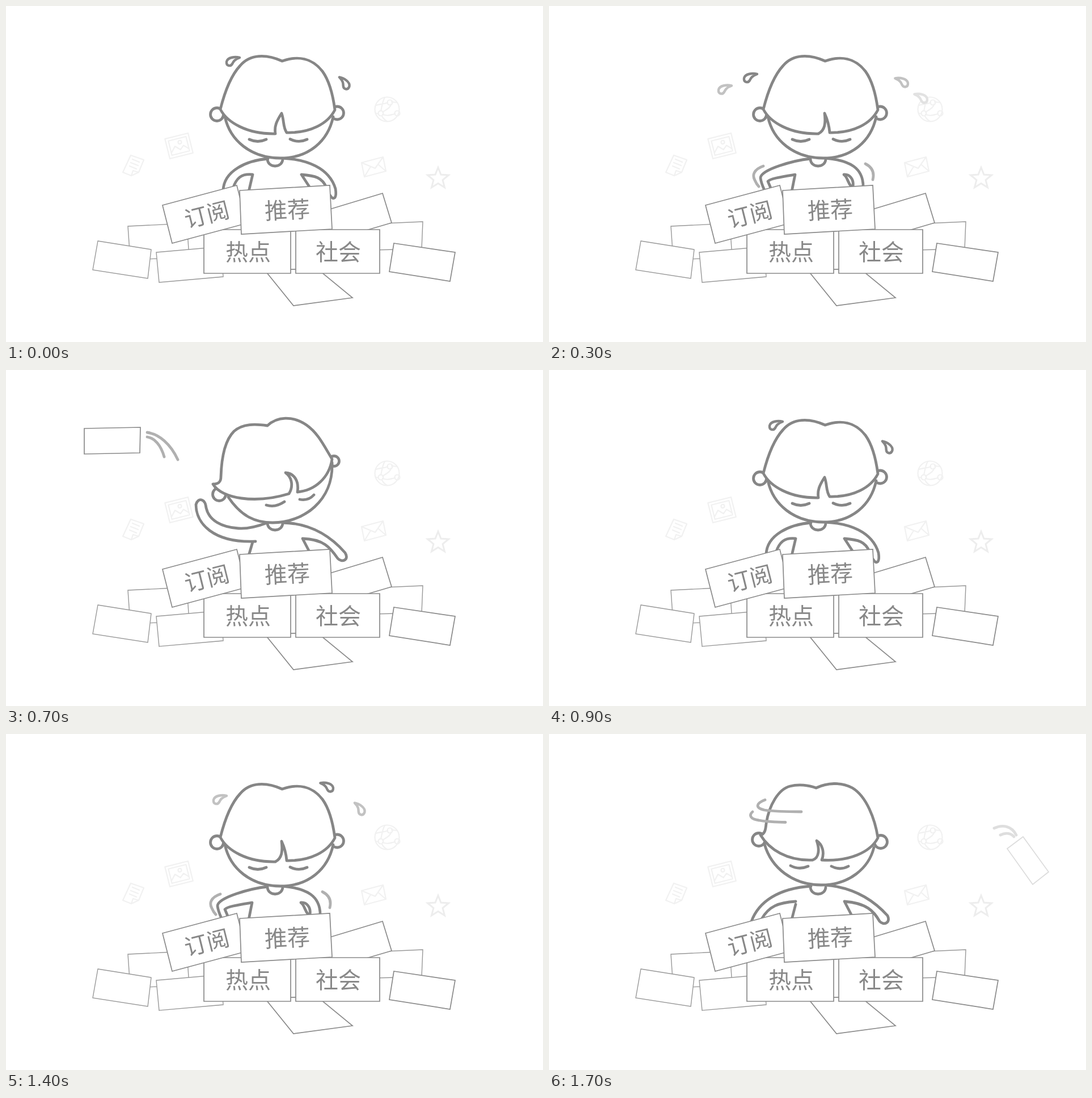
Animation, 947 px wide and 592 px high, one loop 1.8 s. Source, as an HTML page:

```html
<!DOCTYPE html>
<html lang="zh-CN">
<head>
<meta charset="utf-8">
<title>Buried in cards</title>
<style>
  html, body { margin: 0; width: 100%; height: 100%; overflow: hidden; background: #fff; }
  svg { display: block; width: 947px; height: 592px; }
  svg * { stroke-linecap: round; stroke-linejoin: round; }
  .icons { fill: none; stroke: #f1f1f1; stroke-width: 2.2; }
  #star { stroke: #ededed; stroke-width: 3; stroke-linejoin: miter; }
  .boy { fill: none; stroke: #868686; stroke-width: 4.8; }
  .skin { fill: #fff; }
  .mark { stroke: #b0b0b0; }
  .pale { stroke: #dedede; }
  .card { fill: #fff; stroke: #8a8a8a; stroke-width: 1.7; stroke-linejoin: miter; }
  .back .card { stroke: #989898; stroke-width: 1.4; }
  .card.pale { stroke: #dcdcdc; }
  text { font: 400 40px "Noto Sans CJK SC", "Noto Sans CJK", sans-serif; fill: #888; text-anchor: middle; }
</style>
</head>
<body>
<svg viewBox="0 0 947 592">
  <g class="icons">
    <g transform="translate(672 182)">
      <circle r="21.5"/>
      <path d="M-20 -7C-8 -10 -1 -10 1 -12M8 -13L18 -12M-20 7L-15 8M-8 5C0 0 6 -3 7 -9M-8 9C2 13 8 9 14 8M-4 -21C-9 -12 -9 -4 -11 3M-9 12C-7 16 -4 19 0 21"/>
      <circle cx="5" cy="-12" r="4.5"/><circle cx="-11" cy="7" r="4.5"/><circle cx="18" cy="7" r="4.5"/>
    </g>
    <g transform="translate(305 246.500) rotate(-14)">
      <path d="M-21 -18H21V18H-21ZM-16 -13H16V13H-16ZM-16 9L-7 -1L1 7L8 1L16 9"/>
      <circle cx="3" cy="-6" r="3"/>
    </g>
    <path d="M220 263L243 271L234 293L221 299L206 293ZM234 293L224 290L221 299M223 270L235 275M220 276L233 281M218 282L230 287"/>
    <path d="M627 276L665 266L670 291L632 301ZM627 276L651 286L665 266M632 301L643 283M670 291L656 279"/>
    <path id="star"/>
  </g>
  <g class="back">
    <path class="card" d="M215 388L319 383L323 443L219 447Z"/>
    <path class="card" d="M162 414L256 429L250 480L153 465Z"/>
    <path class="card" d="M265 434L379 424L383 477L270 487Z"/>
    <path class="card" d="M600 386L735 380L733 428L600 431Z"/>
  </g>
  <path id="held" class="card" d="M230 360L312 302.500L338 340L256 398Z"/>
  <g id="boy" class="boy"></g>
  <g>
    <path class="card" d="M548 365L664 330L680 382L564 416Z"/>
    <path class="card" d="M684 418L792 434L783 485L676 468Z"/>
    <path class="card" d="M456 465L549 463L611 514L507 528Z"/>
    <path class="card" d="M349 394H502V471H349Z"/>
    <path class="card" d="M511 394H659V471H511Z"/>
    <path class="card" d="M276 351L407 316L424 383L293 418Z"/>
    <path class="card" d="M412 325L571 316L575 393L415 402Z"/>
    <text transform="translate(354 367) rotate(-14)" y="15">订阅</text>
    <text transform="translate(496 359) rotate(-3)" y="15">推荐</text>
    <text x="427" y="448">热点</text>
    <text x="586" y="448">社会</text>
  </g>
</svg>
<script>
const STEP = 100, COUNT = 18, CYCLE = 9;
const $ = id => document.getElementById(id);
const line = (d, cls = '') => `<path class="${cls}" d="${d}"/>`;
const ear = (x, y, r) => `<circle cx="${x}" cy="${y}" r="${r}"/>`;
const flip = s => `<g transform="matrix(-1 0 0 1 952 0)">${s}</g>`;
const head = (ears, face, hair, eyes) => ears + line(face, 'skin') + line(hair, 'skin') + line(eyes);

const front = tuft => head(
  ear(372, 191, 11.5) + ear(584, 188.5, 11.5),
  'M386 195C395 237 432 268 484 268C534 268 568 238 577 195',
  `M378 182C388 142 399 120 413 105C430 85 458 84 487 97C515 87 540 92 558 115C571 133 577 160 580 183C568 207 537 224 495 223${tuft}C425 226 390 205 378 182Z`,
  'M429 235Q444 242 459 235M501 234.500Q516 242 531 235');

const heads = {
  open: front('C488 213 491 203 486 189C477 203 473 212 475 225'),
  calm: front('C494 210 491 200 486 189C488 206 487 219 475 225'),
  tilt: head(
    ear(376, 219, 11.5) + ear(578.5, 160.5, 9),
    'M392 224C415 258 440 269 470 269C525 269 578 230 575 163',
    'M365 201C375 201 379 197 379 188C380 155 385 125 402 108C418 94 440 95 461 98C478 82 505 80 530 97C550 111 560 132 575 157C570 190 545 212 514 215C517 195 508 182 493 181C503 188 508 203 499 218C440 236 380 227 365 201Z',
    'M459 238Q475 243 491 232M518 228Q533 231 543 220'),
  turn: head(
    ear(370, 186, 11.5) + ear(585, 190, 11.5),
    'M380 194C392 236 430 266 480 266C530 266 564 236 573 200',
    'M373 178C381 176 382 168 383 158C388 125 405 97 425 92C440 88 458 90 471 95C490 86 515 84 535 95C560 110 575 150 580 183C567 208 530 225 481 222C486 210 483 195 472 188C477 202 477 218 465 222C420 224 388 203 373 178Z',
    'M426 232Q441 240 457 233M498 233Q513 241 528 233')
};

const neck = line('M461 270C462 286 487 286 488 270');
const bodies = {
  wide: line('M462 269C425 272 384 290 383 325M428 327L435 297C415 295 406 303 400 322M487 268C530 270 570 285 581 322C584 341 576 342 572 334M536 320L521 297C545 299 558 302 565 320'),
  tuck: line('M461 269C430 272 415 285 415 300C415 308 417 315 420 327M434 297L436 327M488 268C530 272 552 285 552 320M520 297C532 300 537 306 537 320')
    + line('M418 273C408 277 404 283 404 291M551 276C559 282 562 290 562 300', 'mark'),
  dig: line('M461 269C432 272 373 288 373 303C374 312 377 318 381 327M428 327L434 297C410 301 390 304 386 309L392 323M488 268C530 272 555 285 554 320M520 297C530 296 538 305 536 318M521 298C527 303 526 310 533 318')
    + line('M378 282C361 288 358 298 363 307M363 307Q366 314 370 318M558 278C570 284 574 294 571 306', 'mark'),
  spread: line('M462 268C405 272 370 295 357 330M435 295C405 297 388 303 375 326M435 300L428 327M487 266C535 270 570 290 597 320C603 333 590 338 583 330C573 312 560 298 521 295L534 320'),
  fling: line('M461 269C440 277 425 280 410 279C380 277 358 265 353 243C351 225 338 225 335 237C335 270 365 305 440 302M435 303L428 327M488 269C535 270 570 290 598 322C606 335 592 340 585 332C572 313 560 298 523 297L535 320')
};

const pose = (h, b) => bodies[b] + neck + heads[h];
const fling = pose('tilt', 'fling')
  + line('M138 103L237 101L236 146L138 148Z', 'card')
  + line('M249 110C270 113 290 130 303 158M249 118C262 120 273 132 279 153', 'mark');
const settle = pose('turn', 'spread')
  + line('M381 116C365 122 363 130 380 134C400 137 420 137 445 137M359 137C352 143 355 150 370 152C385 155 400 155 417 155.500', 'mark');
const dig = pose('calm', 'dig'), tuck = pose('calm', 'tuck');
const poses = [pose('open', 'wide'), dig, tuck, dig, tuck, dig];
const throwLeft = [pose('calm', 'spread'), fling,
  flip(settle) + line('M34 106L132 99L135 144L37 151Z', 'card pale')
  + line('M147 106C165 109 180 122 190 145M147 115C157 117 166 126 171 142', 'pale')];
const throwRight = [tuck, flip(fling),
  settle + line('M808 202L836 181L881 243L853 265Z', 'card pale')
  + line('M785 166C800 159 816 162 824 178M796 178C806 173 815 175 820 181', 'pale')];

// first step, x, y, dx, dy, angle, one tone per step; moves left when dx < 0
const tones = { d: '#868686', g: '#c2c2c2', l: '#e2e2e2' };
const drops = [
  [0, 400, 97, -30, 16.5, 0, 'dddg'],
  [1, 351, 140, -24, 24, -22, 'dg'],
  [2, 384, 111, -29, 15, 0, 'ddg'],
  [4, 400, 97, -23, 18, 0, 'dg'],
  [0, 596, 136, 6, 9, 26, 'ddg'],
  [1, 572, 108, 25, 13, 3, 'ddg'],
  [1, 616, 134, 20, 14, 3, 'gll'],
  [4, 606, 118, 17, 14, 26, 'dg'],
  [5, 566, 93, 18, 18, 3, 'dg']
];
const sweat = k => drops.map(([first, x, y, dx, dy, angle, tone]) => {
  const age = k - first, c = tones[tone[age]];
  return c ? `<path class="skin" style="stroke:${c};stroke-width:4.4" transform="translate(${x + dx * age} ${y + dy * age}) rotate(${angle}) scale(${dx < 0 ? 1 : -1} 1)" d="M12 -6C4 -8 -9 -7 -11 1C-12 9 -4 10 -1 5C1 1 3 -3 12 -6Z"/>` : '';
}).join('');

const scenes = Array.from({ length: COUNT }, (_, i) => {
  const k = i % CYCLE;
  return (poses[k] || (i < CYCLE ? throwLeft : throwRight)[k - 6]) + sweat(k);
});

$('star').setAttribute('d', 'M' + Array.from({ length: 10 }, (_, i) => {
  const a = i * Math.PI / 5, r = i % 2 ? 8.5 : 19.5;
  return `${(762 + r * Math.sin(a)).toFixed(1)} ${(304 - r * Math.cos(a)).toFixed(1)}`;
}).join('L') + 'Z');

let shown = -1;
function draw() {
  const i = Math.floor(performance.now() / STEP) % COUNT;
  if (i !== shown) {
    shown = i;
    $('boy').innerHTML = scenes[i];
    $('held').style.display = i === 6 ? '' : 'none';
  }
  requestAnimationFrame(draw);
}
draw();
</script>
</body>
</html>
```
